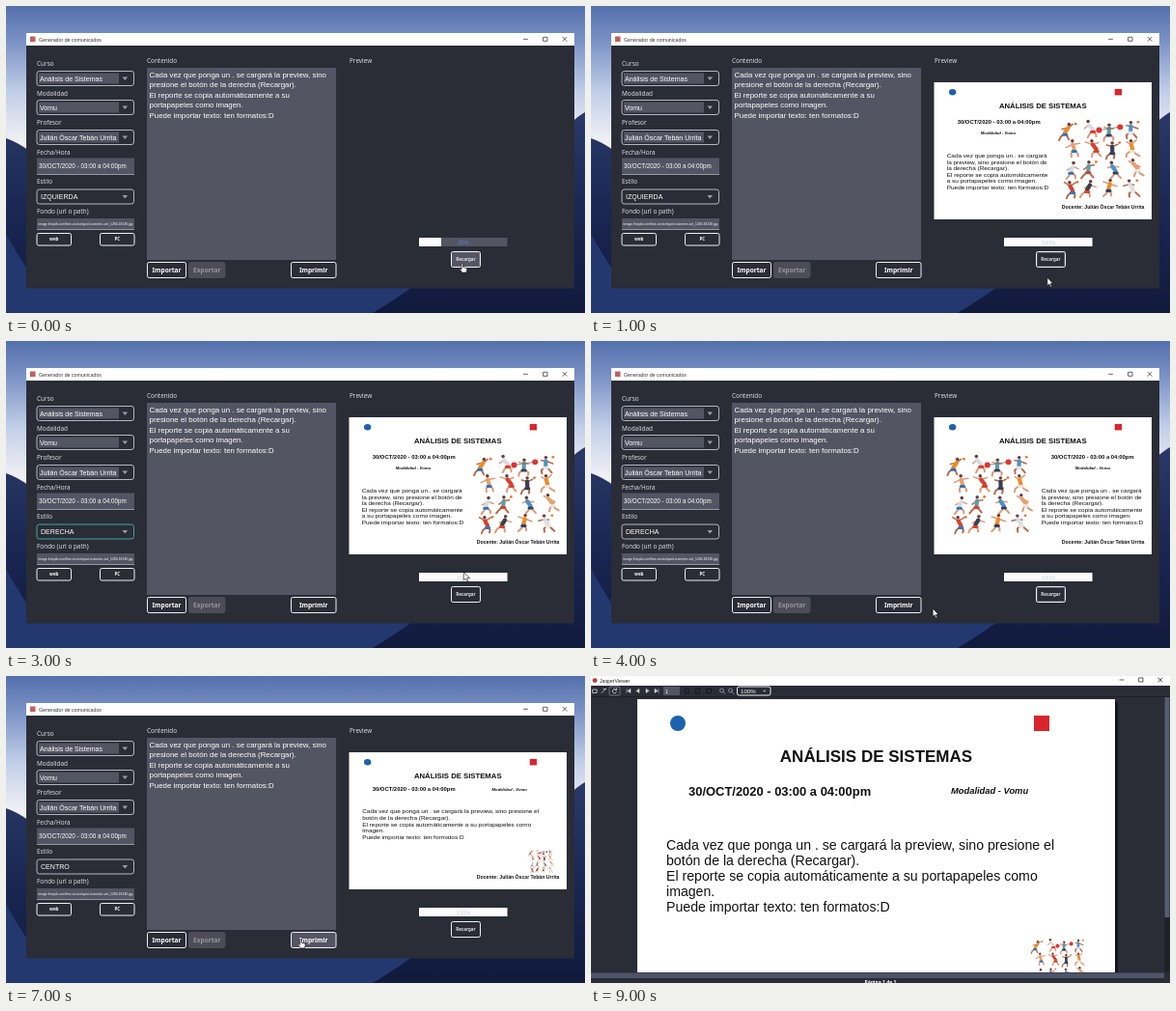
An HTML page for the animation above (10 s loop, 600 px wide and 318 px high).

```html
<!DOCTYPE html>
<html lang="es">
<head>
<meta charset="utf-8">
<title>Generador de comunicados</title>
<style>
html, body { margin: 0; width: 100%; height: 100%; overflow: hidden; background: #17224a; }
svg { display: block; width: 600px; height: 318px; font-family: "Liberation Sans", Arial, sans-serif; }
.ui { font-family: "Noto Sans", sans-serif; }
.b { font-weight: bold; }
.i { font-style: italic; }
</style>
</head>
<body>
<svg id="stage" viewBox="0 0 600 318"></svg>
<script>
const BG = '#2a2c36', FIELD = '#545563', WHITE = '#fff', TEAL = '#3fb8a4';
const TEACHER = 'Julián Óscar Tebán Urrita', MODE = 'Vomu', DATE = '30/OCT/2020 - 03:00 a 04:00pm';
const STYLES = ['IZQUIERDA', 'DERECHA', 'CENTRO'];

const rect = (x, y, w, h, fill, more = '') =>
  `<rect x="${x}" y="${y}" width="${w}" height="${h}" fill="${fill}" ${more}/>`;
const text = (x, y, size, str, fill = WHITE, more = '') =>
  `<text x="${x}" y="${y}" font-size="${size}" fill="${fill}" ${more}>${str}</text>`;
const path = (d, stroke, width = 1, fill = 'none') =>
  `<path d="${d}" stroke="${stroke}" stroke-width="${width}" fill="${fill}" stroke-linecap="round" stroke-linejoin="round"/>`;
const lines = (x, y, size, step, list, fill) =>
  list.map((s, i) => text(x, y + i * step, size, s, fill)).join('');
const label = (x, y, str) => text(x, y, 6.4, str, '#dcdce2', 'class="ui"');
const mid = 'text-anchor="middle"';

function button(x, y, w, h, str, size, { fill = BG, edge = '#f0f0f4', ink = WHITE } = {}) {
  return rect(x, y, w, h, fill, `rx="1.8" stroke="${edge}"`) +
    text(x + w / 2, y + h / 2 + size * .36, size, str, ink, `class="ui b" ${mid}`);
}

function combo(y, str, editable, edge = '#c6c7d0') {
  return rect(32, y, 100.5, 15, BG, `rx="2.5" stroke="${edge}" stroke-width=".9"`) +
    (editable ? rect(34, y + 2, 83, 11, FIELD) : '') +
    text(editable ? 35 : 36, y + 10.4, 7.05, str) +
    path(`M120.5 ${y + 6}h5.6l-2.8 3.4z`, 'none', 0, '#9b9ca8');
}

function winButtons(xs, y) {
  const [a, b, c] = xs;
  return path(`M${a - 2} ${y}h4M${b - 2} ${y - 2}h4v4h-4zM${c - 2} ${y - 2}l4 4m0-4l-4 4`, '#222', .7);
}

const arrow = (x, y) => `<g transform="translate(${x} ${y})">` +
  path('M0 0V8.2L1.9 6.5 3.2 9.5 4.5 8.9 3.2 6H5.7Z', '#111', .6, WHITE) + '</g>';
const hand = (x, y) => `<g transform="translate(${x} ${y})">` +
  path('M0 0Q.8-.9 1.5 0V3.2L5 4Q5.8 4.3 5.6 6L5 8.8H.7L-1.8 5.3Q-1.6 4.2 0 5.2Z', '#111', .6, WHITE) + '</g>';

// Small sports figures on a jittered 4 x 4 grid, 100 units square
function athletes() {
  let seed = 29, out = '';
  const rnd = (a, b) => a + (b - a) * ((seed = (seed * 16807) % 2147483647) / 2147483647);
  const shirts = ['#f08a24', '#d8402f', '#4a93c8', '#d9dde6', '#3b3f4c', '#e9a06a', '#5f9ea8'];
  const shorts = ['#2f74b8', '#d8402f', '#34405e', '#e8e4e0'];
  for (let n = 0; n < 16; n++) {
    const x = 13 + 25 * (n % 4) + rnd(-3, 3), y = 8 + 25 * (n >> 2) + rnd(-2, 3);
    const lean = rnd(-5, 5), hx = x - lean, hy = y + 9, skin = n % 3 ? '#dc9a76' : '#b9694a';
    out += path(`M${hx} ${hy}l${rnd(-7, -2)} 5l${rnd(-4, 1)} 4M${hx} ${hy}l${rnd(2, 6)} 5l${rnd(-1, 5)} 3`, skin, 2.4) +
      path(`M${x - rnd(5, 9)} ${y + rnd(-4, 7)}L${x} ${y + 2}l${rnd(5, 9)} ${rnd(-6, 5)}`, skin, 1.8) +
      path(`M${x} ${y + 2}L${hx} ${hy - 1}`, shirts[n * 3 % 7], 5) +
      path(`M${hx - 1.8} ${hy + 1.8}h3.6`, shorts[n % 4], 3.8) +
      `<circle cx="${x + lean * .2}" cy="${y - 2.6}" r="2.1" fill="#6b3d35"/>`;
    if (n % 3 == 0) out += `<circle cx="${x + 9}" cy="${y - 3}" r="1.7" fill="#e8762c"/>`;
  }
  return out + path('M48 15L74 11', '#555', .8) +
    '<circle cx="48" cy="15" r="3.6" fill="#e0332e"/><circle cx="74" cy="11" r="3.6" fill="#e0332e"/>';
}

const NARROW = ['Cada vez que ponga un . se cargará', 'la preview, sino presione el botón de', 'la derecha (Recargar).',
  'El reporte se copia automáticamente', 'a su portapapeles como imagen.', 'Puede importar texto: ten formatos:D'];
const WIDE = ['Cada vez que ponga un . se cargará la preview, sino presione el', 'botón de la derecha (Recargar).',
  'El reporte se copia automáticamente a su portapapeles como', 'imagen.', 'Puede importar texto: ten formatos:D'];
// date, mode, body: x y; art: x y w h
const LAYOUTS = [
  { date: [101, 129.5], mode: [154, 157.5], body: [77, 216], list: NARROW, art: [335, 116, 184, 198] },
  { date: [314, 129.5], mode: [369, 157.5], body: [292, 216], list: NARROW, art: [81, 116, 184, 198] },
  { date: [101, 123.5], mode: [373, 122], body: [78, 180], list: WIDE, art: [457, 271, 55, 58] }
];

// Report page, 495 x 349 with its corner at 48,24
function page(k) {
  const { date, mode, body, list, art: [ax, ay, w, h] } = LAYOUTS[k], ink = '#111';
  return rect(48, 24, 495, 349, WHITE) +
    '<circle cx="90" cy="49" r="8" fill="#1d62ae"/>' + rect(459, 41, 16, 16, '#d8262c') +
    text(295.5, 89.3, 17, 'ANÁLISIS DE SISTEMAS', ink, `class="b" ${mid}`) +
    text(...date, 12.95, DATE, ink, 'class="b"') +
    text(...mode, 9.35, 'Modalidad - ' + MODE, ink, 'class="b i"') +
    lines(...body, 14.13, 16.1, list, ink) +
    `<g transform="translate(${ax} ${ay}) scale(${w / 100} ${h / 100})">${athletes()}</g>` +
    text(526.5, 346, 11.3, 'Docente: ' + TEACHER, ink, 'class="b" text-anchor="end"');
}

const wallpaper = `<defs>
  <linearGradient id="sky" gradientUnits="userSpaceOnUse" x1="0" y1="0" x2="0" y2="140"><stop stop-color="#5470ac"/><stop offset=".25" stop-color="#7890c4"/><stop offset=".65" stop-color="#c3d0e9"/><stop offset="1" stop-color="#f0f0f5"/></linearGradient>
  <linearGradient id="dune" x2="0" y2="1"><stop stop-color="#2a3968"/><stop offset=".5" stop-color="#1a2753"/><stop offset="1" stop-color="#101a3c"/></linearGradient>
</defs>` + rect(0, 0, 600, 318, 'url(#sky)') +
  path('M0 137Q12 141 24 150L560 150Q585 118 600 110V318H0Z', 'none', 0, 'url(#dune)') +
  path('M0 236Q14 262 30 284H430Q410 300 380 318H0Z', 'none', 0, '#22386f');

function main(s) {
  const onCombo = s.focus == 'combo', onReload = s.focus == 'reload';
  let out = wallpaper + rect(21, 28, 568, 264.5, BG) +
    rect(21, 28, 568, 13, WHITE) + rect(25, 31.5, 5.5, 5.5, '#c4605c') +
    text(34, 36.8, 5.27, 'Generador de comunicados', '#333') + winButtons([538.5, 559, 579], 34.3);
  ['Curso', 'Modalidad', 'Profesor', 'Fecha/Hora', 'Estilo', 'Fondo (url o path)']
    .forEach((name, i) => out += label(32, 62.4 + i * 30.5, name));
  out += label(146, 59, 'Contenido') + label(356, 59, 'Preview') +
    combo(67.5, 'Análisis de Sistemas', true) + combo(97.5, MODE, true) + combo(128.5, TEACHER, true) +
    rect(32, 157.5, 101, 17, FIELD) + rect(32, 174, 101, .9, '#a0a1ac') + text(34, 168.3, 6.3, DATE) +
    combo(190, STYLES[s.style], false, onCombo ? TEAL : undefined) +
    rect(32, 220, 101, 11.5, FIELD) + rect(32, 231, 101, .9, '#a0a1ac') +
    text(82.5, 227.2, 3.35, 'image.freepik.com/free-vector/sport-isometric-set_1284-18138.jpg', WHITE, mid) +
    button(32, 235.5, 35.5, 12.5, 'web', 4.5) + button(97.5, 235.5, 35.5, 12.5, 'PC', 4.5) +
    rect(146, 64, 196, 199, FIELD) +
    lines(148.5, 73.5, 7.88, 10.5, ['Cada vez que ponga un . se cargará la preview, sino', 'presione el botón de la derecha (Recargar).',
      'El reporte se copia automáticamente a su', 'portapapeles como imagen.', 'Puede importar texto: ten formatos:D']) +
    button(146.5, 265.5, 40, 16, 'Importar', 6.6) +
    button(189.5, 265.5, 37.5, 16, 'Exportar', 6.6, { fill: '#4c4d57', edge: '#4c4d57', ink: '#94959e' }) +
    button(295.5, 265.5, 46.5, 16, 'Imprimir', 6.6, s.print ? { fill: FIELD } : {});
  if (s.open) {
    out += rect(32, 205.5, 100.5, 42, BG, 'stroke="#6b6c78" stroke-width=".8"') + rect(32.5, 205.5 + 14 * s.open, 99.5, 14, FIELD);
    STYLES.forEach((name, i) => out += text(36, 215 + 14 * i, 7.05, name));
  }
  if (s.view >= 0)
    out += `<g transform="translate(355.5 79) scale(${225.5 / 495} ${142 / 349}) translate(-48 -24)">${page(s.view)}</g>`;
  out += rect(428, 240, 91.5, 9, FIELD) + rect(428, 240, s.done < 100 ? 23 : 91.5, 9, '#fbfbfd') +
    text(474, 246.6, 5.6, s.done + '%', s.done < 100 ? '#5c83cf' : '#cfd0da', mid) +
    button(461.5, 254.5, 30, 16, 'Recargar', 4.5, { fill: s.press ? FIELD : BG, ink: '#e4e4ea' });
  if (onReload) out += rect(462.7, 255.7, 27.6, 13.6, 'none', 'stroke="#666774" stroke-width=".7"');
  return out;
}

function viewer() {
  const ink = '#d5d6de';
  return rect(0, 0, 600, 318, BG) + rect(0, 0, 600, 10, WHITE) +
    '<circle cx="4" cy="4.6" r="2.4" fill="#c62f35"/>' + text(9, 6.6, 5.2, 'JasperViewer', '#222') + winButtons([550, 570, 590], 4) +
    path('M2 14h4v3.5h-4zM11 17.5l4-4M13 13.5h2.5', ink, .8) +
    rect(19, 11, 11, 9, 'none', 'rx="1.5" stroke="#8d8e99" stroke-width=".7"') + path('M26 14a2.2 2.2 0 1 0 .5 2.5M26.5 12.8v1.7h-1.7', ink, .8) +
    path('M37 13.5v4M41 13.5v4l-3-2zM50 13.5v4l-3-2zM57 13.5v4l3-2zM66 13.5v4l3-2zM70 13.5v4', ink, .5, ink) +
    rect(75, 11, 17, 9, FIELD) + text(77, 17.8, 5.5, '1') +
    path('M98 13h3.5v5H98zM109 13h3.5v5H109zM120 13.5h4.5v4H120z', '#15161c', .9) +
    path('M137.5 15a2 2 0 1 0-4 0a2 2 0 1 0 4 0M137 16.5l2 2M146.5 15a2 2 0 1 0-4 0a2 2 0 1 0 4 0M146 16.5l2 2', '#a9aab4', .7) +
    rect(151.5, 11, 34.5, 9, BG, `rx="2" stroke="${WHITE}" stroke-width=".9"`) + text(155, 17.9, 6.2, '100%') +
    path('M178 14.7h3.6l-1.8 2.2z', 'none', 0, '#9b9ca8') +
    rect(0, 21, 600, 1, '#1d1f28') + rect(51, 27, 495, 281, '#15161d') + page(2) +
    rect(0, 307, 600, 11, BG) + rect(0, 307.5, 594, 5.5, '#4d5468') +
    rect(594, 22, 6, 285, '#20222b') + rect(594.5, 22, 5, 228, '#555d72') +
    text(300, 319, 5, 'Página 1 de 1', WHITE, `class="ui b" ${mid}`);
}

// One state per second
const STATES = [
  { style: 0, view: -1, done: 20, focus: 'reload', press: true, cursor: hand(472, 267.3) },
  { style: 0, view: 0, done: 100, focus: 'reload', cursor: arrow(472.9, 281.5) },
  { style: 0, view: 0, done: 100, focus: 'combo', open: 1, cursor: arrow(100, 222) },
  { style: 1, view: 0, done: 100, focus: 'combo', cursor: arrow(474.3, 239.7) },
  { style: 1, view: 1, done: 100, focus: 'reload', cursor: arrow(354.2, 277.3) },
  { style: 1, view: 1, done: 100, focus: 'combo', open: 2, cursor: arrow(100, 236) },
  { style: 2, view: 2, done: 100, focus: 'reload', cursor: arrow(474, 276) },
  { style: 2, view: 2, done: 100, print: true, cursor: hand(304.5, 273) },
  { viewer: true, cursor: arrow(303.7, 272.4) },
  { viewer: true, cursor: '' }
];

const stage = document.getElementById('stage');
let shown = -1;
function tick() {
  const n = Math.floor(performance.now() % 10000 / 1000);
  if (n != shown) {
    const s = STATES[shown = n];
    stage.innerHTML = (s.viewer ? viewer() : main(s)) + s.cursor;
  }
  requestAnimationFrame(tick);
}
tick();
</script>
</body>
</html>
```
